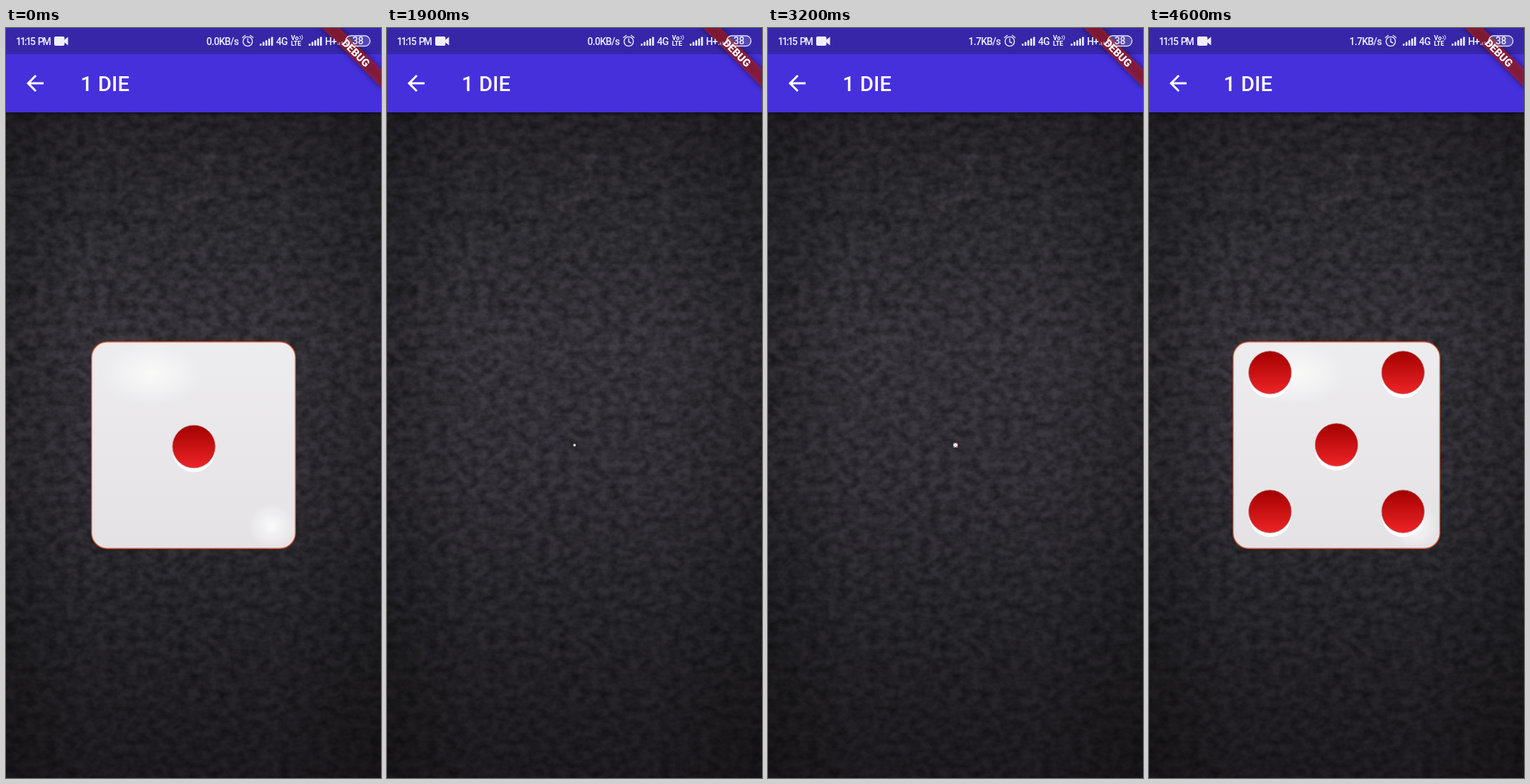
These frames come from a looping animation (529x1058 px, 5200 ms). An HTML page:

```html
<!DOCTYPE html>
<html lang="en">
<head>
<meta charset="utf-8">
<title>1 DIE</title>
<style>
  html, body { margin: 0; width: 100%; height: 100%; overflow: hidden; background: #1b1a1d; }
  svg { position: absolute; left: 0; top: 0; width: 100%; height: 100%; }
  text { font-family: Roboto, sans-serif; fill: #fff; }
  .status { font-size: 13.8px; font-weight: 500; fill: #f1efff; }
</style>
</head>
<body>

<!-- Stone wall -->
<svg viewBox="0 0 529 1058">
  <defs>
    <linearGradient id="wall" x2="0" y2="1">
      <stop offset=".11" stop-color="#2b292e"/>
      <stop offset=".25" stop-color="#36353a"/>
      <stop offset=".42" stop-color="#3f3d43"/>
      <stop offset=".6" stop-color="#3a383e"/>
      <stop offset=".77" stop-color="#2d2c31"/>
      <stop offset=".9" stop-color="#262428"/>
      <stop offset="1" stop-color="#211f23"/>
    </linearGradient>
    <linearGradient id="sides">
      <stop offset="0" stop-opacity=".22"/>
      <stop offset=".22" stop-opacity="0"/>
      <stop offset=".72" stop-opacity="0"/>
      <stop offset="1" stop-opacity=".22"/>
    </linearGradient>
    <filter id="grain" x="0" y="0" width="1" height="1" color-interpolation-filters="sRGB">
      <feTurbulence type="fractalNoise" baseFrequency=".07 .09" numOctaves="4" seed="8"/>
      <feColorMatrix values="0 0 0 0 0  0 0 0 0 0  0 0 0 0 0.01  .8 0 0 0 -.2"/>
    </filter>
    <filter id="rough" filterUnits="userSpaceOnUse" x="-20" y="100" width="570" height="960">
      <feTurbulence type="fractalNoise" baseFrequency=".07" numOctaves="4" seed="3"/>
      <feDisplacementMap in="SourceGraphic" scale="34" xChannelSelector="R" yChannelSelector="G"/>
      <feGaussianBlur stdDeviation="1.5"/>
    </filter>
  </defs>
  <rect width="529" height="1058" fill="url(#wall)"/>
  <rect width="529" height="1058" filter="url(#grain)"/>
  <rect width="529" height="1058" fill="url(#sides)"/>
  <g filter="url(#rough)" fill="none" stroke="#000" stroke-opacity=".22" stroke-width="4">
    <path d="M295 235Q245 275 225 320T188 392L140 380"/>
    <path d="M300 345Q370 315 420 325T535 285"/>
    <path d="M0 535L45 500L95 470"/>
    <path d="M60 275Q110 250 175 280" stroke-width="12"/>
    <path d="M0 375L45 365M0 470L40 460" stroke-width="16" stroke-opacity=".18"/>
    <path d="M330 250L420 210L529 190" stroke-width="3"/>
    <path d="M235 255L280 235L290 180" stroke="#77757c" stroke-opacity=".14" stroke-width="9"/>
  </g>
</svg>

<!-- Die -->
<svg viewBox="0 0 529 1058">
  <defs>
    <linearGradient id="body" x2="0" y2="1">
      <stop offset="0" stop-color="#edecee"/>
      <stop offset="1" stop-color="#e4e2e5"/>
    </linearGradient>
    <linearGradient id="pip" x2="0" y2="1">
      <stop offset="0" stop-color="#a30000"/>
      <stop offset="1" stop-color="#ef2427"/>
    </linearGradient>
    <radialGradient id="shine">
      <stop offset="0" stop-color="#fafaf9"/>
      <stop offset="1" stop-color="#fafafa" stop-opacity="0"/>
    </radialGradient>
  </defs>
  <g id="die"></g>
</svg>

<!-- App bar and banner, with the status icons on top -->
<svg viewBox="0 0 529 1058">
  <defs>
    <linearGradient id="barShadow" x2="0" y2="1">
      <stop offset="0" stop-opacity=".4"/>
      <stop offset="1" stop-opacity="0"/>
    </linearGradient>
    <filter id="soft" y="-1" height="3"><feGaussianBlur stdDeviation="4.5"/></filter>
  </defs>
  <rect y="119" width="529" height="6" fill="url(#barShadow)"/>
  <rect width="529" height="119" fill="#4630dc"/>
  <rect width="529" height="37" fill="#3727a8"/>

  <path transform="translate(23 60) scale(1.5)" fill="#fff"
    d="M20 11H7.83l5.59-5.59L12 4l-8 8 8 8 1.41-1.41L7.83 13H20z"/>
  <text x="105.3" y="88.5" font-size="29.4" font-weight="500" letter-spacing=".2">1 DIE</text>

  <g transform="translate(529 0) rotate(45)">
    <rect x="-62" y="41" width="124" height="18" opacity=".5" filter="url(#soft)"/>
    <rect x="-62" y="41" width="124" height="18" fill="#b71c1c" fill-opacity=".63"/>
    <text y="55.3" text-anchor="middle" font-size="15" font-weight="900">DEBUG</text>
  </g>

  <text class="status" x="14" y="24" letter-spacing="-1.8" word-spacing="3">11:15 PM</text>
  <g fill="#f1efff">
    <rect x="68" y="12" width="14.5" height="13" rx="2"/>
    <path d="M82 17l5.5-4.5v12l-5.5-4.5z"/>
  </g>
  <text class="status" id="speed" x="328" y="24" text-anchor="end" letter-spacing="-.6"></text>
  <g fill="none" stroke="#f1efff" stroke-width="1.4" stroke-linecap="round">
    <circle cx="341" cy="19" r="6.6"/>
    <path d="M341 15v4.5l3 1.5M333.5 13.5l4-3M348.5 13.5l-4-3"/>
  </g>
  <g id="signals" fill="#f1efff"></g>
  <text class="status" x="381" y="24" letter-spacing="-.6">4G</text>
  <g font-size="9" font-weight="700">
    <text x="402" y="16.5">Vo</text>
    <text x="402" y="25" letter-spacing="-.2">LTE</text>
  </g>
  <path d="M414.5 11q2 2.5 0 5M417 10q3 3.5 0 7" fill="none" stroke="#f1efff"/>
  <text class="status" x="450" y="24" letter-spacing="-.8">H+</text>
  <path d="M468 24v-2M470.5 24v-4M474 24v-5" stroke="#f1efff" stroke-opacity=".6" stroke-width="1.4"/>
  <rect x="479" y="11" width="34.5" height="14.5" rx="7.25" fill="#fff" fill-opacity=".15" stroke="#e6e2fa" stroke-width="1.4"/>
  <text class="status" x="496.5" y="23" text-anchor="middle">38</text>
</svg>

<script>
const LOOP = 5200, STEP = 100;
const die = document.getElementById('die');
const speed = document.getElementById('speed');

// Pip centres relative to the middle of the full-size die
const FACES = {
  1: { width: 289, pips: [[0.5, 2]] },
  4: { width: 290, pips: corners(94.7, -101.5, 96.5) },
  5: { width: 293, pips: [...corners(93.8, -102.5, 93.5), [0, -0.5]] },
};

// [time, phase]: 0 to 1 shrinks the die, 1 to 2 grows it back
const ROLLS = [
  { next: 4, keys: [[270, 0], [500, .228], [1400, 1.118], [2000, 1.735], [2200, 1.963], [2300, 2]] },
  { next: 5, keys: [[2490, 0], [2700, .228], [4000, 1.506], [4510, 2]] },
];

function corners(dx, top, bottom) {
  return [[-dx, top], [dx, top], [-dx, bottom], [dx, bottom]];
}

function drawPip([x, y]) {
  return `<circle cx="${x}" cy="${y + 6}" r="30" fill="#fff"/>
    <circle cx="${x}" cy="${y}" r="30.2" fill="url(#pip)" stroke="#b9898b" stroke-width=".8"/>`;
}

function drawFace({ width, pips }) {
  return `<rect x="${-width / 2 + .7}" y="-145.8" width="${width - 1.4}" height="291.6" rx="22"
      fill="url(#body)" stroke="#d8502f" stroke-width="1.4"/>
    <ellipse cx="-59" cy="-101" rx="72" ry="44" fill="url(#shine)"/>
    <circle cx="110" cy="114" r="33" fill="url(#shine)"/>
    ${pips.map(drawPip).join('')}`;
}

function bounceOut(p) {
  const arc = (centre, floor) => 7.5625 * (p - centre / 2.75) ** 2 + floor;
  if (p < 1 / 2.75) return arc(0, 0);
  if (p < 2 / 2.75) return arc(1.5, .75);
  if (p < 2.5 / 2.75) return arc(2.25, .9375);
  return arc(2.625, .984375);
}

function phaseAt(keys, t) {
  if (t <= keys[0][0]) return 0;
  const i = keys.findIndex(([time]) => time > t);
  if (i < 0) return 2;
  const [t0, a] = keys[i - 1], [t1, b] = keys[i];
  return a + (b - a) * (t - t0) / (t1 - t0);
}

function signalBars(x) {
  return [0, 1, 2, 3, 4].map(i => {
    const height = 3 + i * 2.4;
    return `<rect x="${x + i * 4}" y="${25 - height}" width="2.6" height="${height}" rx=".8"/>`;
  }).join('');
}

document.getElementById('signals').innerHTML = signalBars(358) + signalBars(427);

let shownFace;
function render(now) {
  const t = Math.floor(now % LOOP / STEP) * STEP;
  let face = 1, scale = 1;
  for (const { next, keys } of ROLLS) {
    const phase = phaseAt(keys, t);
    if (phase >= 1) face = next;
    scale *= 1 - bounceOut(1 - Math.abs(1 - phase));
  }
  if (face !== shownFace) die.innerHTML = drawFace(FACES[shownFace = face]);
  die.setAttribute('transform', `translate(264.5 588.5) scale(${scale})`);
  speed.textContent = t < 2400 ? '0.0KB/s' : '1.7KB/s';
}

const start = performance.now();
function tick() {
  render(performance.now() - start);
  requestAnimationFrame(tick);
}
tick();
</script>
</body>
</html>
```
